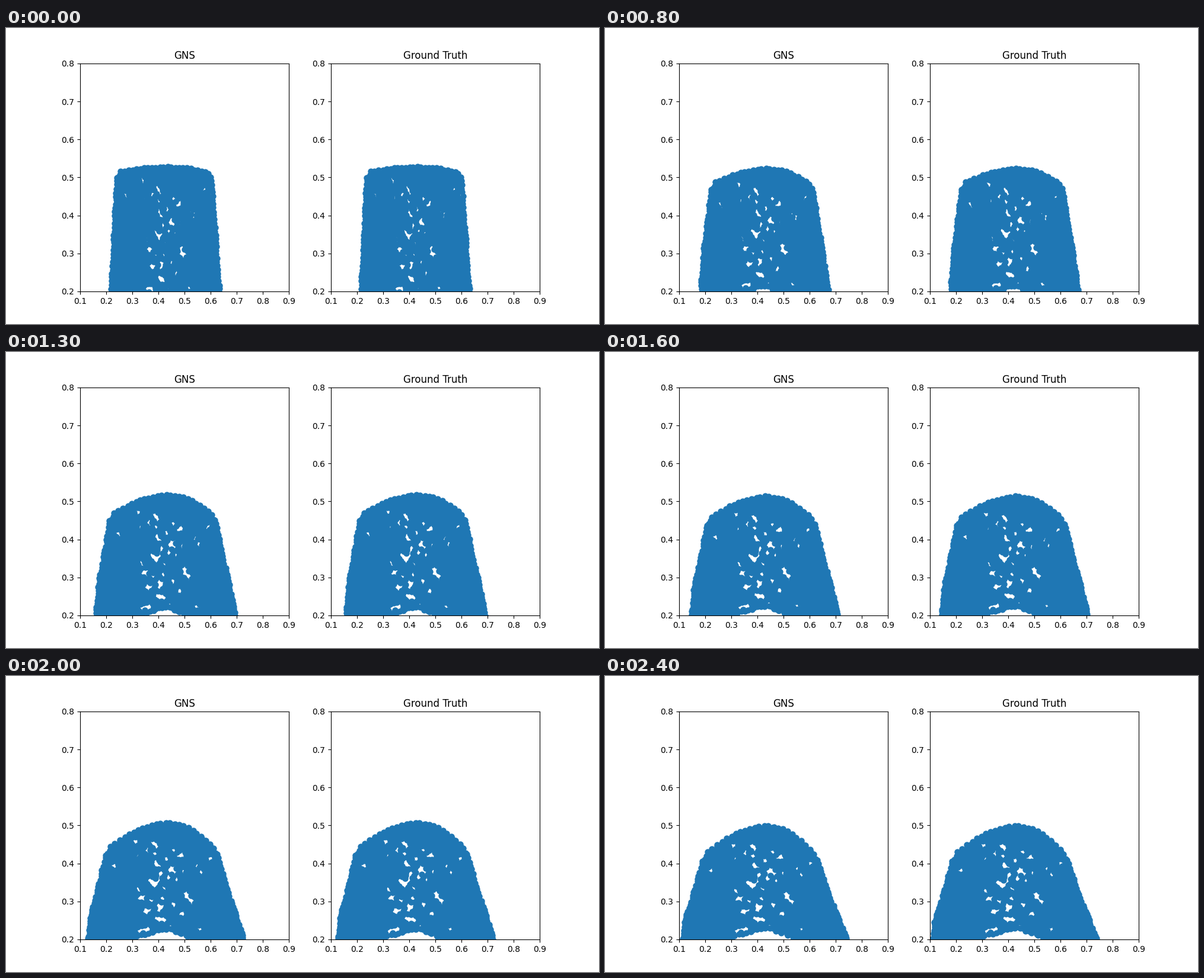
A matplotlib script that plays this animation: 1000x500 px, repeating every 2.5 s.

```python
import numpy as np
import matplotlib.pyplot as plt
from matplotlib.animation import FuncAnimation

FRAMES = 25
MID = 278       # column around which the block sags
STEP = 4.5      # spacing of the inner particles, in pixels
rng = np.random.default_rng(7)

# The widest gaps of the collapsed block, in stage pixels.
GAPS = np.array([(236, 298), (296, 305), (270, 312), (232, 395),
                 (255, 410), (266, 410), (235, 428)], float)


# Sides and top of the block at rest.
def left(y):
    return 187 - 0.05 * (y - 250)


def right(y):
    return 346 + 0.07 * (y - 250)


def top(x):
    return 235 + 10 * ((x - 267) / 80) ** 2


def move(p, t):
    """Place particles p at progress t (0 to 1)."""
    x, y = p.T
    lo, hi = left(y), right(y)
    depth = np.clip(y - 250, 0, None)

    # The sides spread apart, more so near the floor.
    dl = -22 - 0.2 * np.minimum(depth, 125)
    dr = 12 + 0.235 * np.minimum(depth, 165)
    dx = dl + (dr - dl) * (x - lo) / (hi - lo)

    # The sides sink steadily; the core falls late and is pushed up below.
    w = np.abs(x - MID) / np.where(x < MID, MID - lo, hi - MID)
    w = np.clip(w, 0, 1.05) ** 1.8
    core = (4 - 0.176 * (y - 235)) * t + 14 * t * t
    side = (60 - 27 * (depth / 152) ** 1.8) * t
    return np.column_stack((x + dx * t, y + core * (1 - w) + side * w))


def clear_of(p, holes, r):
    gap = p[:, None] - holes
    return np.hypot(gap[..., 0], gap[..., 1]).min(axis=1) > r


def jitter(p, size):
    return p + rng.uniform(-size, size, p.shape)


def rim():
    y = np.arange(252, 482, 6.5)
    x = np.arange(194, 342, 6.5)
    sides = [np.column_stack((edge(y), y)) for edge in (left, right)]
    return jitter(np.vstack((*sides, np.column_stack((x, top(x))))), 1)


def core():
    x, y = np.meshgrid(np.arange(172, 366, STEP), np.arange(234, 482, STEP))
    x[1::2] += STEP / 2
    p = jitter(np.column_stack((x.ravel(), y.ravel())), 1.2)
    x, y = p.T
    p = p[(x > left(y) + 2) & (x < right(y) - 2) & (y > top(x) + 2)]

    end = move(p, 1)
    off = end[:, 0] - 277
    arch = 426 + np.where(off < 0, -0.27, 0.47) * off
    specks = rng.normal((262, 345), (48, 48), (55, 2))
    keep = clear_of(end, GAPS, 5.9) & clear_of(end, specks, 5.5)
    return p[keep & (end[:, 1] < arch)]


particles = np.vstack((core(), rim()))

fig, axes = plt.subplots(1, 2, figsize=(10, 5), dpi=100)
dots = []
for ax, title in zip(axes, ("GNS", "Ground Truth")):
    ax.set(xlim=(0.1, 0.9), ylim=(0.2, 0.8), title=title,
           xticks=np.arange(1, 10) / 10, yticks=np.arange(2, 9) / 10)
    dots += ax.plot([], [], "o", color="#1f77b4", mew=1.5)


def draw(i):
    t = i / (FRAMES - 1)
    x, y = move(particles, t).T
    for line, shift in zip(dots, (0, -1.2)):
        line.set_data(0.1 + (x + shift - 125) / 440.34,
                      0.2 + (445 - y) / 641.67)
    return dots


anim = FuncAnimation(fig, draw, frames=FRAMES, interval=100,
                     init_func=lambda: draw(0), repeat=True)
plt.show()
```
